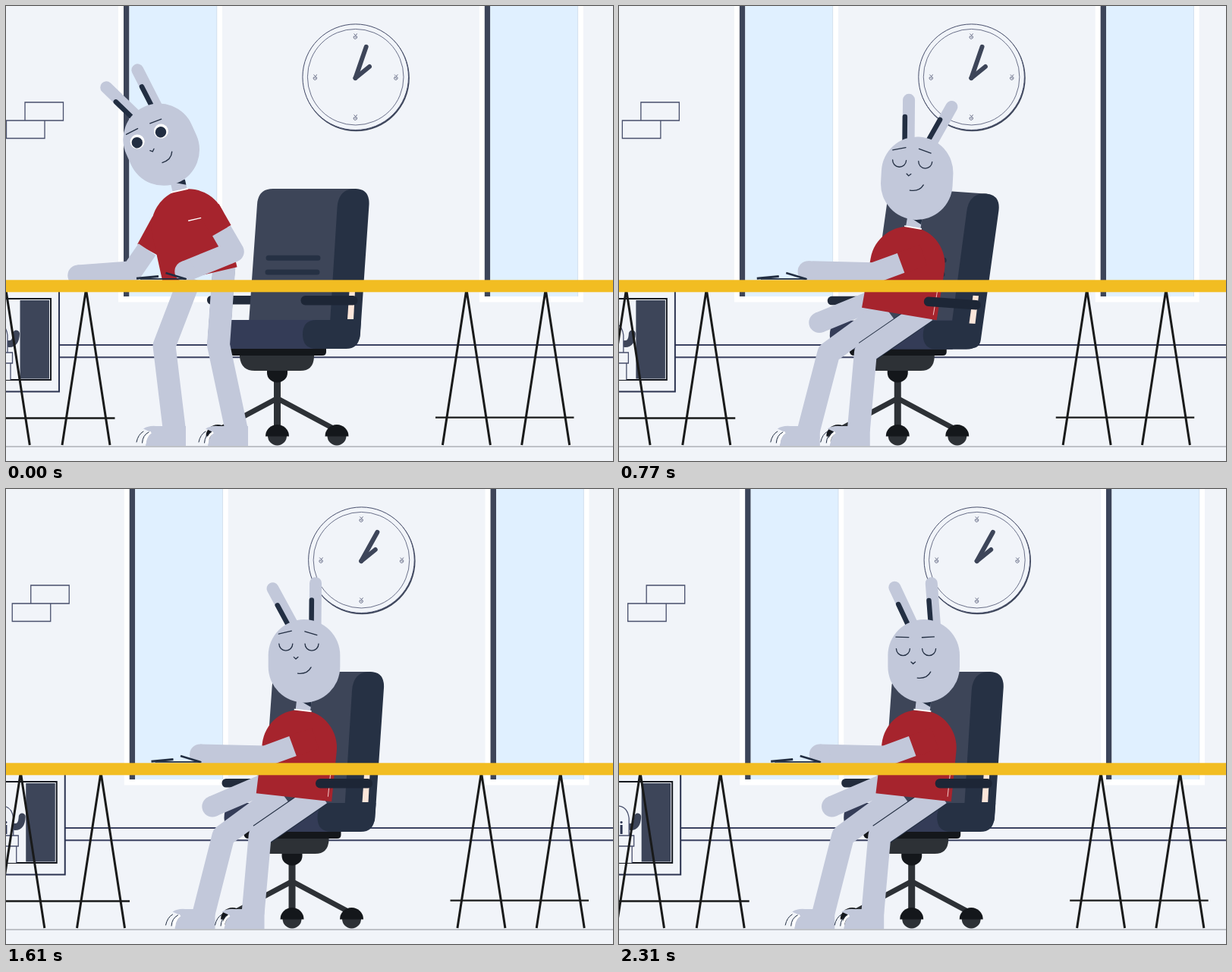
Write an HTML page that moves like this. It is 800x600 px and loops after 2.38 s.

```html
<!DOCTYPE html>
<html lang="en">
<head>
<meta charset="utf-8">
<title>Sitting down at the desk</title>
<style>
  html, body { margin: 0; width: 100%; height: 100%; overflow: hidden; background: #f1f4f9; }
  svg { display: block; width: 100%; height: 100%; }
  .skin { fill: #c2c8da; }
  .limb { fill: none; stroke: #c2c8da; stroke-width: 30; stroke-linejoin: round; }
  .arm { stroke-width: 27.5; }
  .sleeve { fill: none; stroke: #a6242d; stroke-width: 29; }
  .ear { stroke: #c2c8da; stroke-width: 16; stroke-linecap: round; }
  .inner { stroke: #222e42; stroke-width: 6.5; stroke-linecap: round; }
  .fine { fill: none; stroke: #222e42; stroke-width: 1.3; stroke-linecap: round; }
  .thin { fill: none; stroke: #484f6c; stroke-width: 1.3; }
  .leg { fill: none; stroke: #191a1a; stroke-width: 3; }
</style>
</head>
<body>
<svg viewBox="0 0 800 600" preserveAspectRatio="none">
  <defs>
    <g id="window">
      <rect y="-5" width="137" height="395.500" fill="#fff"/>
      <rect x="7" y="-5" width="7.500" height="388" fill="#3d4559"/>
      <rect x="14.500" y="-5" width="115.500" height="388" fill="#e0f0ff"/>
      <path d="M129.800 0V383" stroke="#ccd9e8" stroke-width=".7"/>
    </g>
    <path id="numeral" d="M-2 -3.500L0 -1.500L2.500 -3.500M-1 -1C-4 1 -1.500 4.500 1 3C3 1.500 2 -1.500 0 -.5C-1.500 .5 0 2 1 1"
      fill="none" stroke="#484f6c" stroke-width=".8"/>
    <path id="trestle" class="leg" d="M-31.500 579L-.5 377H.5L31.500 579"/>
    <g id="wheel">
      <circle r="12.500" cy="567" fill="#2d3136"/>
      <path d="M-15.500 567.500A15.500 15.500 0 0 1 15.500 567.500Z" fill="#14171b"/>
    </g>
    <g id="foot">
      <path class="skin" d="M15 580H-38L-36.500 572Q-34 566 -31 562L-41 557.500Q-34 553 -24 554H15Z"/>
      <path d="M-39 577Q-38.500 567 -31 562" fill="none" stroke="#fff" stroke-width="3"/>
      <path class="fine" style="stroke-width:1" d="M-50 575Q-48 565 -41 561M-42.500 576Q-42 566 -34 562"/>
    </g>
    <g id="eye">
      <circle r="9.500" fill="#fff"/>
      <circle cx="-.8" cy="1" r="7.200" fill="#222e42"/>
      <rect id="lid" class="skin" x="-10.500" y="-10.500" width="21" height="0"/>
    </g>
    <path id="shut" class="fine" d="M-9 0A9 9 0 0 0 9 0"/>
  </defs>

  <rect width="800" height="600" fill="#f1f4f9"/>
  <g id="wall">
    <use href="#window" x="148"/>
    <use href="#window" x="623.800"/>
    <path class="thin" d="M25 127h50.500v24h-50.500zM.5 151h50.500v23.500h-50.500z"/>
    <path d="M70 447H810M70 463.300H810" stroke="#3b4262" stroke-width="2"/>
    <circle cx="461.500" cy="95" r="70.300" fill="#3d4559"/>
    <circle cx="460.700" cy="93.700" r="69.800" fill="#f1f4f9" stroke="#484f6c"/>
    <circle cx="460.700" cy="93.700" r="63.300" fill="none" stroke="#484f6c" stroke-width=".8"/>
    <use href="#numeral" x="460.500" y="40"/><use href="#numeral" x="514" y="94"/>
    <use href="#numeral" x="460.500" y="147"/><use href="#numeral" x="407.500" y="94"/>
    <g stroke="#3d4559" stroke-width="6" stroke-linecap="round">
      <path d="M460.500 95L479 80"/>
      <path id="minute" d="M460.500 95V51.500"/>
    </g>
    <rect x="-60" y="370" width="130" height="138.500" fill="#f1f4f9" stroke="#2b3350" stroke-width="2"/>
    <rect x="-60" y="386" width="119" height="107" fill="#f1f4f9" stroke="#15181f" stroke-width="2"/>
    <rect x="18.500" y="388" width="38.500" height="103.500" fill="#3d4559"/>
    <path d="M4 445.500Q13 446 13.500 432" fill="none" stroke="#3d4559" stroke-width="9" stroke-linecap="round"/>
    <path class="thin" style="fill:#f1f4f9" d="M-30 493V471H-32V457H-28V434Q-26 418 -12 418Q0 419 2 434V457H8.500V471H6V493M-30 471H6M-28 457H2"/>
    <text x="-8" y="455" text-anchor="middle" font-family="Inter, 'DejaVu Sans', sans-serif" font-size="21" font-weight="700" fill="#2b3350">i</text>
  </g>

  <path d="M0 581H800" stroke="#8b8f96" stroke-width="1.200"/>

  <g id="room">
    <path d="M357.500 485V562" stroke="#2d3136" stroke-width="9"/>
    <path d="M279 559.500L357.500 517.500L436 559.500" fill="none" stroke="#2d3136" stroke-width="7"/>
    <use href="#wheel" x="279"/><use href="#wheel" x="357.500"/><use href="#wheel" x="436"/>
    <path d="M344 481H371V484A13.500 12.500 0 0 1 344 484Z" fill="#14171b"/>
    <path d="M308 458H406V463Q405 481 388 481H328Q310 481 308 463Z" fill="#2d3136"/>
    <path d="M294 451H422V456Q422 461 417 461H300Q295 461 294 456Z" fill="#14171b"/>
    <g class="sink"><rect x="265" y="382" width="75" height="11.500" rx="5.500" fill="#222b3b"/></g>
    <g class="lean">
      <path d="M331 262Q332 241 352 241H462L430 418H320Z" fill="#3d4558"/>
      <path d="M346 332.300H411M345 351H410" stroke="#263144" stroke-width="7" stroke-linecap="round"/>
      <path d="M436.500 266Q438 241 460 241Q479.500 241 478.500 262L466.800 434Q466 446 452 446H427V418Z" fill="#263144"/>
    </g>
    <g class="sink">
      <path d="M284 414H430V452H294Q268 452 268 434Q268 414 284 414Z" fill="#343c57"/>
      <path d="M409 414H468L466.500 434Q465 452 448 452H409Q391 452 391 433Q391 414 409 414Z" fill="#263144"/>
    </g>
    <g class="lean"><path d="M452.500 376H460L458 413H450Z" fill="#fce6da"/></g>

    <path id="farSleeve" class="sleeve"/>
    <path id="farArm" class="limb arm"/><circle id="farHand" class="skin" r="13.700"/>
    <path id="farLeg" class="limb"/><use id="farFoot" href="#foot"/>
    <path id="crease" fill="none" stroke="#222e42"/>
    <path id="nearLeg" class="limb"/><use id="nearFoot" href="#foot"/>
    <g id="torso">
      <rect class="skin" x="-10.500" y="-74" width="19.500" height="25"/>
      <path d="M-7 -62H9V-55Z" fill="#222e42"/>
      <path d="M-50 66L-49.300 0A49.300 50 0 0 1 49.300 0L50 66Z" fill="#a6242d"/>
      <path d="M-12.500 -49.500H10.500" stroke="#fff" stroke-width="2"/>
      <path d="M1 -8H18.500" stroke="#fff" stroke-width="1.400"/>
      <path d="M44.500 27V60" stroke="#f3c9c9"/>
    </g>
    <path id="nearSleeve" class="sleeve"/>
    <path id="nearArm" class="limb arm"/><circle id="nearHand" class="skin" r="13.700"/>
    <path id="earL" class="ear"/><path id="innerL" class="inner"/>
    <path id="earR" class="ear"/><path id="innerR" class="inner"/>
    <g id="head">
      <rect class="skin" x="-47.300" y="-54.800" width="94.600" height="109.600" rx="47.300"/>
      <g id="face">
        <use class="eyes" x="-23.500" y="-23"/><use class="eyes" x="10.700" y="-23"/>
        <path id="brows" class="fine"/>
        <path class="fine" d="M-13 -5.500L-10.300 -3L-7.300 -5.500"/>
      </g>
      <path id="mouth" class="fine" d="M-8.500 16Q4 17.500 9 8"/>
    </g>
    <g class="lean"><rect x="388.500" y="382" width="75" height="12.500" rx="6" fill="#1d2636"/></g>
    <g fill="none" stroke="#222e42">
      <path d="M177 359.800H238" stroke-width="1.800"/>
      <path d="M172 359.300L201 356.500" stroke-width="3"/>
      <path d="M210.500 352L237 360" stroke-width="2.600"/>
    </g>
    <use href="#trestle" x="-.2"/><use href="#trestle" x="105.500"/>
    <use href="#trestle" x="606.900"/><use href="#trestle" x="711.200"/>
    <path class="leg" style="stroke-width:2.300" d="M-40 543.500H143.500M566 542.700H748.500"/>
  </g>
  <rect y="361.300" width="800" height="16" fill="#f2bd22"/>
</svg>
<script>
const STEP = 70, LOOP = 2380;

// Key poses; a value not named keeps easing towards its next mention.
const poses = [
  { at: 0, x: 241, y: 291.3, turn: -13, tilt: -24, sway: -36.5, splay: 9.5,
    sit: 0, scoot: 0, nod: 1, frown: .3, lid: 0, lean: 0, sink: 0 },
  { at: 5, x: 356.6, y: 345, turn: -2.5, tilt: -20, sway: -47, splay: 10.5,
    sit: 1, scoot: .2, nod: .15, frown: 1, lid: .5, lean: 0, sink: 3 },
  { at: 9, x: 370.5, y: 341, turn: 9.5, tilt: 3, sway: 15, splay: 14.5,
    scoot: .95, nod: .05, lid: 1, lean: 4, sink: .8 },
  { at: 14, x: 367.2, y: 341.2, turn: 6.3, tilt: 0, sway: -9.3, scoot: 1, nod: 0, lean: 1.3, sink: 0 },
  { at: 18, sway: -14, lean: 0 },
  { at: 21, splay: 14.5, nod: .1, frown: 1 },
  { at: 26, sway: -14.7, splay: 10.4, nod: 1, frown: 0 }
];

const tracks = {};
for (const name in poses[0])
  tracks[name] = poses.filter(p => name in p).map(p => ({ at: p.at, v: p[name] }));

// Smooth curve through the keys that never overshoots them.
function sample(keys, s) {
  const last = keys.length - 1;
  if (s >= keys[last].at) return keys[last].v;
  let i = 0;
  while (s >= keys[i + 1].at) i++;
  const slope = k => (keys[k + 1].v - keys[k].v) / (keys[k + 1].at - keys[k].at);
  const tangent = k => {
    if (k === 0) return slope(0);
    if (k === last) return 0;
    const a = slope(k - 1), b = slope(k);
    return a * b <= 0 ? 0 : 2 * a * b / (a + b);
  };
  const span = keys[i + 1].at - keys[i].at, u = (s - keys[i].at) / span, w = 1 - u;
  return keys[i].v * w * w * (1 + 2 * u) + keys[i + 1].v * u * u * (1 + 2 * w)
    + span * u * w * (w * tangent(i) - u * tangent(i + 1));
}

const $ = id => document.getElementById(id);
const all = q => document.querySelectorAll(q);
const set = (el, o) => { for (const k in o) el.setAttribute(k, o[k]); };
const move = (el, x, y, turn = 0) => set(el, { transform: `translate(${x} ${y}) rotate(${turn})` });
const line = (...p) => 'M' + p.map(n => n.toFixed(2)).join(' ');
const mix = (a, b, t) => a.map((n, i) => n + (b[i] - n) * t);
const polar = (deg, len) => [Math.sin(deg * Math.PI / 180) * len, -Math.cos(deg * Math.PI / 180) * len];

// Limbs, standing and seated. Arms: hand, elbow, cuff, shoulder from the chest.
const arms = {
  near: [[-5, 58.7, 59, 32.7, 43, 5, 27, -23], [-131, 9, -44.5, 11, -8.7, -2.2, 21, -12.5]],
  far: [[-146, 64, -75, 58.7, -55, 29.7, -35, -7], [-114.7, 77.5, -44.7, 47.5, -34, 10.5, -23, -9.5]]
};
// Legs: hip, knee, ankle x in the room.
const legs = {
  near: [[288, 335, 280, 447, 304], [395, 402, 315.2, 457, 306]],
  far: [[243, 358, 208.5, 448, 222], [344, 401, 267, 457.5, 241]]
};

function drawArm(name, t, x, y) {
  const p = mix(...arms[name], t).map((n, i) => n + (i % 2 ? y : x));
  set($(name + 'Arm'), { d: line(...p.slice(0, 6)) });
  set($(name + 'Hand'), { cx: p[0], cy: p[1] });
  set($(name + 'Sleeve'), { d: line(...p.slice(4)) });
}

function drawLeg(name, p) {
  set($(name + 'Leg'), { d: line(...p, 560) });
  set($(name + 'Foot'), { x: p[4] });
}

function drawEar(side, [x, y], angle) {
  const [dx, dy] = polar(angle, 58.7), [ox, oy] = polar(angle - 90, 5);
  const at = t => [x + dx * t + ox, y + dy * t + oy];
  set($('ear' + side), { d: line(x, y, x + dx, y + dy) });
  set($('inner' + side), { d: line(...at(.05), ...at(.62)) });
}

function draw(s) {
  const p = {};
  for (const name in tracks) p[name] = sample(tracks[name], s);

  // Nearer things slide faster than the wall.
  move($('wall'), s * .43, 0);
  move($('room'), s * 1.0846, 0);
  set($('minute'), { transform: `rotate(${s < 12 ? 19 : 29} 460.5 95)` });

  all('.sink').forEach(e => move(e, 0, p.sink));
  all('.lean').forEach(e => set(e, { transform: `translate(0 ${p.sink}) rotate(${p.lean} 385 440)` }));

  // The far side trails behind while dropping into the chair.
  const lag = p.sit * (1 - p.scoot);
  drawArm('far', p.scoot, p.x, p.y - 9 * lag);
  drawArm('near', p.sit, p.x, p.y);

  const near = mix(...legs.near, p.sit), far = mix(...legs.far, p.sit);
  far[2] -= 7 * lag;
  far[4] -= 19 * lag;
  drawLeg('far', far);
  drawLeg('near', near);
  set($('crease'), { d: line(...near.slice(0, 4)), 'stroke-width': 29 + 3 * p.scoot });

  move($('torso'), p.x, p.y, p.turn);

  // The neck bends halfway between chest and head.
  const [nx, ny] = polar((p.turn + p.tilt) / 2, 114.5), hx = p.x + nx, hy = p.y + ny;
  const onHead = (x, y) => {
    const [ax, ay] = polar(p.tilt + 90, x), [bx, by] = polar(p.tilt, -y);
    return [hx + ax + bx, hy + ay + by];
  };
  move($('head'), hx, hy, p.tilt);
  drawEar('L', onHead(-13.5, -44), p.sway - p.splay);
  drawEar('R', onHead(14.5, -44), p.sway + p.splay);

  move($('face'), -3.8 * Math.sqrt(p.nod), 6.7 * p.nod);
  move($('mouth'), 0, 6.3 * p.nod);
  set($('brows'), { d: line(-33, -38.5 + 2.5 * p.frown, -16, -38 - 2 * p.frown)
    + line(1.5, -37.8 - 1.5 * p.frown, 17.5, -38.6 + 4.2 * p.frown) });
  all('.eyes').forEach(e => set(e, { href: p.lid > .92 ? '#shut' : '#eye' }));
  set($('lid'), { height: 21 * p.lid });
}

// Every fifth tick holds the picture.
function stepAt(ms) {
  const tick = Math.floor((ms % LOOP) / STEP);
  return tick - Math.floor((tick + 3) / 5);
}

const start = performance.now();
function loop() {
  draw(stepAt(Math.max(0, performance.now() - start)));
  requestAnimationFrame(loop);
}
loop();
</script>
</body>
</html>
```
